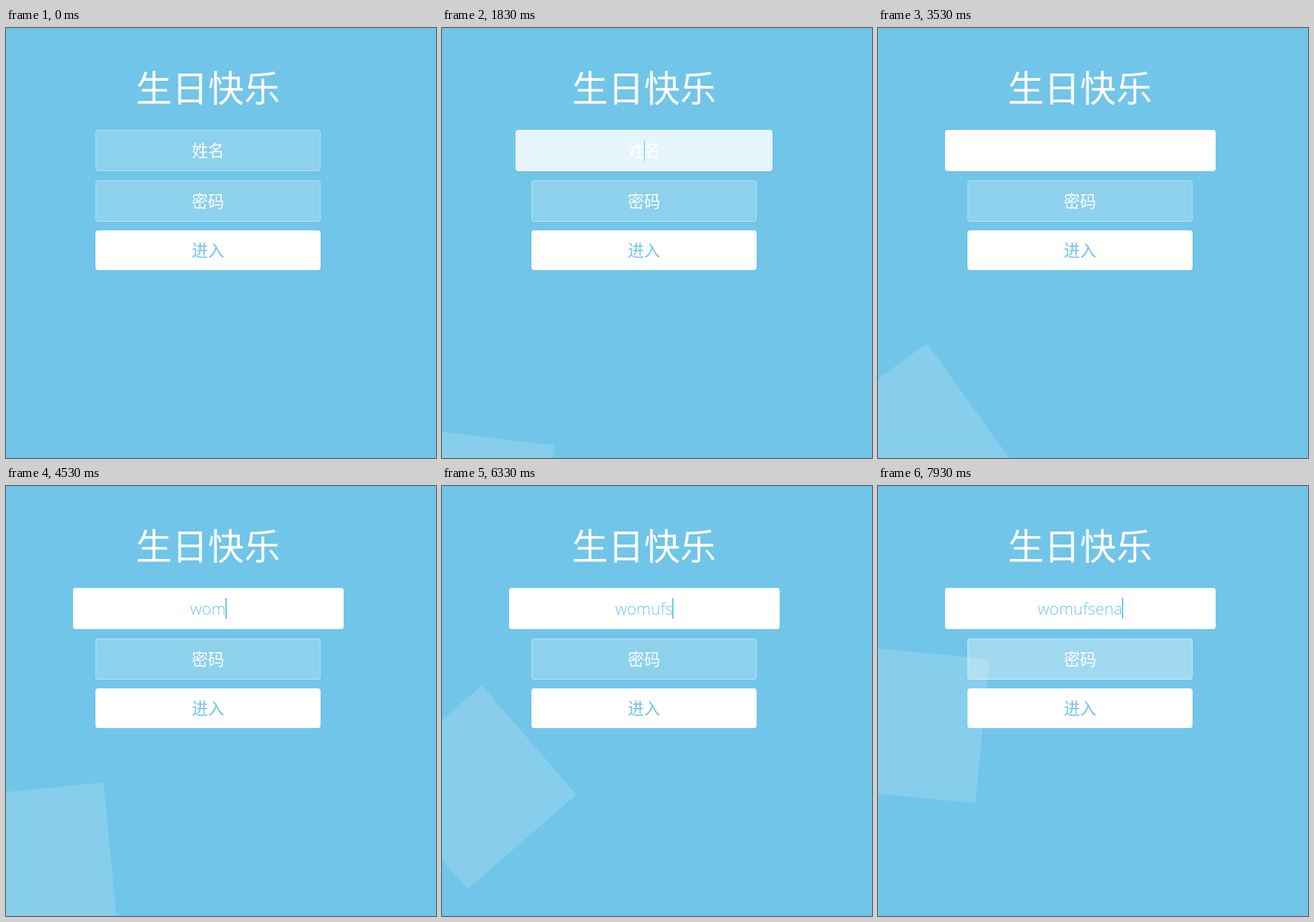
An HTML page for the animation above (8 s loop, 596 px wide and 595 px high).

```html
<!DOCTYPE html>
<html lang="zh-CN">
<head>
<meta charset="utf-8">
<style>
  html, body { margin: 0; width: 100%; height: 100%; overflow: hidden; background: #71c5e8; }
  svg { display: block; width: 100%; height: 100%; }
  text { font: 300 22.5px "Open Sans", "Noto Sans CJK SC", "Noto Sans CJK", sans-serif; text-anchor: middle; fill: #fff; }
  .title { font-size: 50px; }
  .blue { fill: #71c5e8; }
  .border { fill: none; stroke: #fff; stroke-opacity: .4; }
</style>
</head>
<body>
<svg viewBox="0 0 596 595">
  <rect id="bubble" x="-100" y="-100" width="200" height="200" fill="#fff" fill-opacity=".15"/>
  <text class="title" x="280" y="102">生日快乐</text>

  <rect id="nameFill" y="141" height="57" rx="3.75" fill="#fff"/>
  <rect id="nameBorder" class="border" y="141.5" height="56" rx="3.25"/>
  <text id="placeholder" x="280" y="178">姓名</text>
  <text id="typed" class="blue" x="280" y="178"></text>
  <rect id="caret" class="blue" y="155" height="29"/>

  <rect id="passFill" x="124" y="211" width="312" height="57" rx="3.75" fill="#fff"/>
  <rect class="border" x="124.5" y="211.5" width="311" height="56" rx="3.25"/>
  <text x="280" y="247.5">密码</text>

  <rect x="124" y="280" width="312" height="55" rx="3.75" fill="#fff"/>
  <text class="blue" x="280" y="316">进入</text>
</svg>
<script>
const LOOP = 8000, STEP = 100, OFFSET = 30;
const WORD = 'womufsena';
const KEY_TIMES = [3630, 4030, 4330, 4730, 5430, 6130, 6430, 7130, 7430];
const HOVER_NAME = 1030, FOCUS_NAME = 1725, HOVER_PASS = 7830;
const BLINK = 600, TRANSITION = 250;
const BUBBLE_LIFE = 45000, BUBBLE_AGE = 4380;

const el = id => document.getElementById(id);
const set = (id, attrs) => {
  for (const name in attrs) el(id).setAttribute(name, attrs[name]);
};
const mix = (a, b, p) => a + (b - a) * p;

// CSS "ease": cubic-bezier(.25, .1, .25, 1), solved by bisection
function ease(x) {
  if (x <= 0) return 0;
  if (x >= 1) return 1;
  let low = 0, high = 1, u;
  for (let i = 0; i < 30; i++) {
    u = (low + high) / 2;
    if (.75 * u * (1 - u) + u ** 3 < x) low = u; else high = u;
  }
  return .3 * u * (1 - u) ** 2 + 3 * u * u * (1 - u) + u ** 3;
}
const transition = (t, start) => ease((t - start) / TRANSITION);

function drawBubble(t) {
  const p = ease((t + BUBBLE_AGE) / BUBBLE_LIFE);
  set('bubble', { transform: `translate(45.2 ${846.5 - 1125 * p}) rotate(${600 * p})` });
}

function drawNameField(t) {
  const focus = transition(t, FOCUS_NAME);
  const half = mix(312, 375, focus) / 2;
  const left = Math.round(280 - half), right = Math.round(280 + half);
  const hovered = mix(.2, .4, transition(t, HOVER_NAME));
  set('nameFill', { x: left, width: right - left, 'fill-opacity': mix(hovered, 1, focus) });
  set('nameBorder', { x: left + .5, width: right - left - 1 });

  const count = KEY_TIMES.filter(time => time <= t).length;
  el('typed').textContent = WORD.slice(0, count);
  set('placeholder', { visibility: count ? 'hidden' : 'visible' });

  const blinkOn = Math.floor((t - FOCUS_NAME) / BLINK) % 2 === 0;
  const visible = t >= FOCUS_NAME && (count > 0 || blinkOn);
  const textWidth = count ? el('typed').getComputedTextLength() : 0;
  set('caret', {
    x: Math.round(280 + textWidth / 2 - (count ? 1 : 0)),
    width: count ? 2 : 1,
    visibility: visible ? 'visible' : 'hidden'
  });
}

function draw(t) {
  drawBubble(t);
  drawNameField(t);
  set('passFill', { 'fill-opacity': mix(.2, .4, transition(t, HOVER_PASS)) });
}

function frame() {
  const t = performance.now() % LOOP;
  draw(Math.max(0, Math.floor((t - OFFSET) / STEP) * STEP + OFFSET));
  requestAnimationFrame(frame);
}
frame();
</script>
</body>
</html>
```
